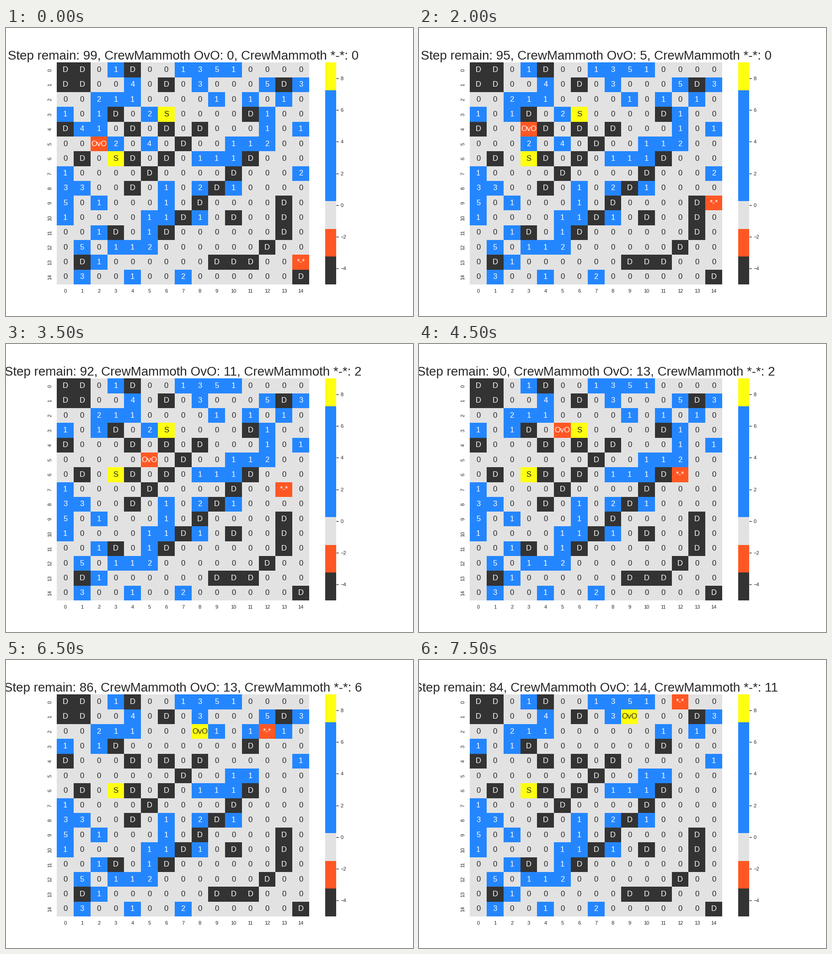
Write a matplotlib script that moves like this. It is 890 px wide and 629 px high and loops after 8 s.

```python
import numpy as np
import matplotlib.pyplot as plt
from matplotlib.animation import FuncAnimation
from matplotlib.colors import ListedColormap

BOARD = """
DD01D0013510000
DD0040D030005D3
002110000101010
101D02S0000D100
D410D0D0D000101
0002040D0011200
0D0SD0D0111D000
10000D0000D0002
3300D0102D10000
50100010D0000D0
1000011D10D00D0
001D01D000000D0
050112000000D00
0D1000000DDD000
03001002000000D
""".split()
SIZE = len(BOARD)
WALL, AGENT, SHIELD = -5, -2, 9
CODES = {"D": WALL, "S": SHIELD}
MOVES = {"U": (-1, 0), "D": (1, 0), "L": (0, -1), "R": (0, 1)}

# face, start cell, route
TEAMS = [
    ("OvO", (5, 2), "LURRDRRUURRRURU"),
    ("*-*", (13, 14), "UUUUUULLUUUUUUU"),
]
TEAM_NAME = "CrewMammoth"
FIRST_STEP = 99
FRAMES = 16

INK = "#262626"
DARK, ORANGE, GREY, BLUE, YELLOW = "#333333", "#ff5724", "#e2e2e2", "#2486ff", "#ffff10"
CMAP = ListedColormap([DARK, ORANGE, GREY] + [BLUE] * 4 + [YELLOW])

plt.rcParams.update({
    "font.family": "Liberation Sans",
    "font.size": 12,
    "text.color": INK,
    "xtick.color": INK,
    "ytick.color": INK,
})


def state(step):
    """Replay the routes; return cell values, labels and scores."""
    labels = np.array([list(row) for row in BOARD], dtype=object)
    scores = []
    agents = []
    for face, (r, c), route in TEAMS:
        score, value = 0, AGENT
        for move in route[:step]:
            dr, dc = MOVES[move]
            r, c = r + dr, c + dc
            if labels[r, c] == "S":
                value = SHIELD
            else:
                score += int(labels[r, c])
            labels[r, c] = "0"
        scores.append(score)
        agents.append((r, c, face, value))
    values = np.array([[CODES[s] if s in CODES else int(s) for s in row] for row in labels])
    for r, c, face, value in agents:
        labels[r, c], values[r, c] = face, value
    return values, labels, scores


def text_color(value):
    return INK if value in (0, SHIELD) else "white"


fig, ax = plt.subplots(figsize=(8.9, 6.29), dpi=100, facecolor="white")
# zero line width keeps the cell edges on whole pixels
mesh = ax.pcolormesh(np.zeros((SIZE, SIZE)), cmap=CMAP, vmin=WALL, vmax=SHIELD,
                     linewidth=0, edgecolor="white")
ax.set(xlim=(0, SIZE), ylim=(SIZE, 0))
ax.set_xticks(np.arange(SIZE) + 0.5, range(SIZE))
ax.set_yticks(np.arange(SIZE) + 0.5, range(SIZE), rotation=90, va="center")
ax.tick_params(length=0, pad=7, labelsize=8)
ax.spines[:].set_visible(False)
title = ax.set_title("", fontsize=20, pad=5)

bar = fig.colorbar(mesh, ax=ax, ticks=range(-4, 9, 2))
bar.outline.set_linewidth(0)
bar.solids.set_linewidth(0)
bar.ax.tick_params(length=3.5, pad=3.5, width=1, labelsize=8)

cells = [[ax.text(c + 0.5, r + 0.5, "", ha="center", va="center")
          for c in range(SIZE)] for r in range(SIZE)]


def update(step):
    values, labels, scores = state(step)
    mesh.set_array(values)
    for r, row in enumerate(cells):
        for c, cell in enumerate(row):
            cell.set_text(labels[r, c])
            cell.set_color(text_color(values[r, c]))
    parts = [f"Step remain: {FIRST_STEP - step}"]
    parts += [f"{TEAM_NAME} {team[0]}: {score}" for team, score in zip(TEAMS, scores)]
    title.set_text(", ".join(parts))
    return []


anim = FuncAnimation(fig, update, frames=FRAMES, interval=500, repeat=True,
                     repeat_delay=0, init_func=lambda: update(0))
plt.show()
```
